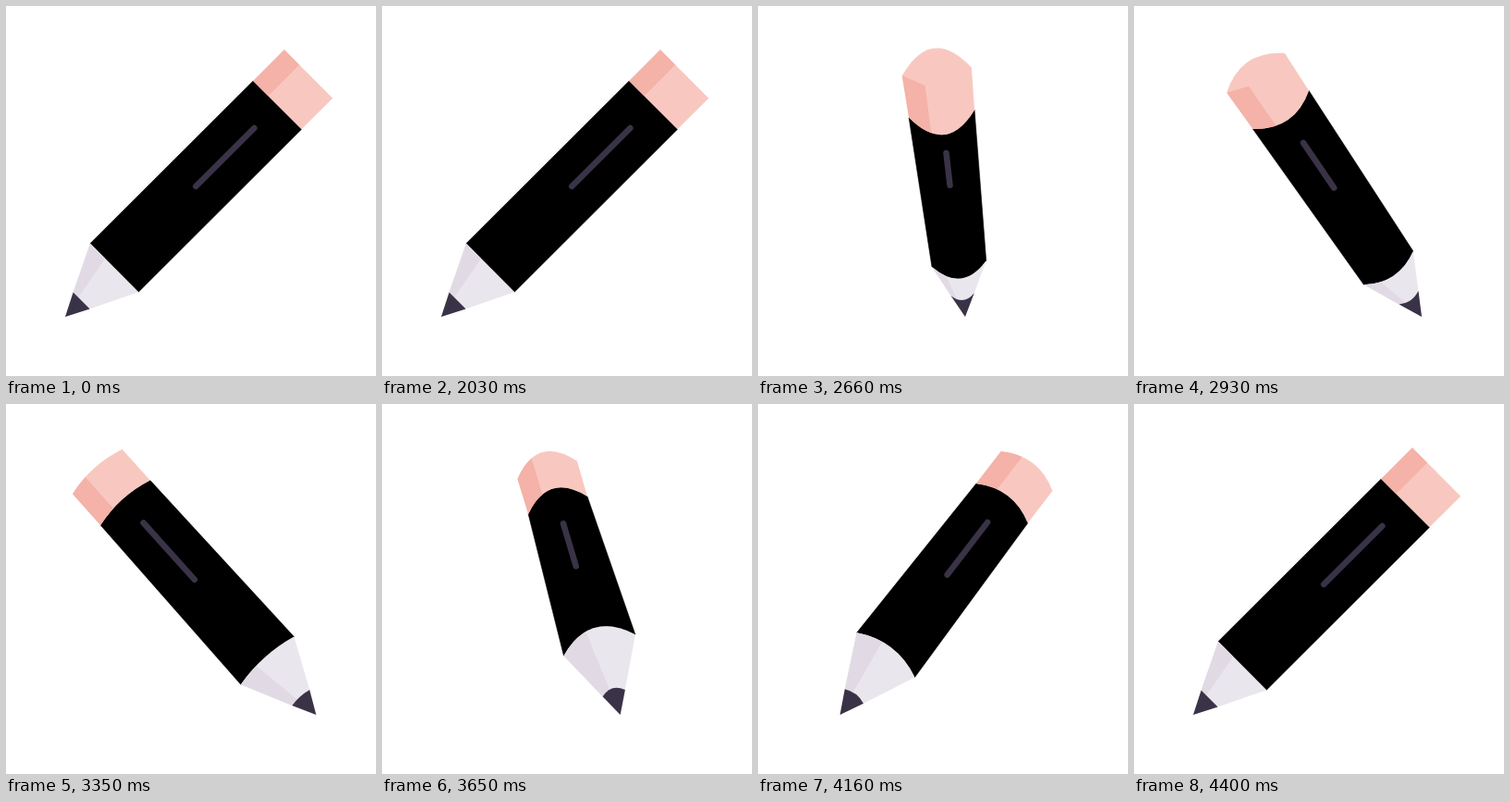
Recreate the animation shown at these times as an HTML page. Size 400 by 400 pixels, loop 4430 ms.

```html
<!DOCTYPE html>
<html lang="en">
<head>
<meta charset="utf-8">
<title>Spinning pencil</title>
<style>
  html, body { margin: 0; width: 100%; height: 100%; overflow: hidden; background: #fff; }
  svg { display: block; width: 100vw; height: 100vh; }
</style>
</head>
<body>
<svg viewBox="0 0 400 400">
  <path id="body" fill="#000" stroke="#000" stroke-width=".6"/>
  <path id="eraser" fill="#f8c8c0"/>
  <path id="eraserShade" fill="#f4b2a8"/>
  <path id="wood" fill="#eae6ed"/>
  <path id="woodShade" fill="#e1dae5"/>
  <path id="lead" fill="#3a3347"/>
  <path id="shine" fill="none" stroke="#3a3347" stroke-width="6.5" stroke-linecap="round"/>
</svg>
<script>
const LOOP = 4430, START = 2030, SPIN = 2370, STEP = 30;
const CX = 205, SPLIT = .31;

const mix = (p, q, f) => [p[0] + (q[0] - p[0]) * f, p[1] + (q[1] - p[1]) * f];
const xy = p => p[0].toFixed(2) + " " + p[1].toFixed(2);
const set = (id, d) => document.getElementById(id).setAttribute("d", d);

// Curved edge from a to b, with control point c
const curve = ({ a, b, c }) => `${xy(a)}Q${xy(c)} ${xy(b)}`;
const reverse = ({ a, b, c }) => ({ a: b, b: a, c });
function part({ a, b, c }, f) {
  const p = mix(a, c, f);
  return { a, c: p, b: mix(p, mix(c, b, f), f) };
}

function draw(ms) {
  const spin = Math.max(0, Math.floor((ms - START) / STEP) * STEP);
  const angle = spin / SPIN * Math.PI * 2;
  const s = Math.sin(angle), c = Math.cos(angle);
  // Value at rest, change when foreshortened, change when the tip is far
  const vary = (rest, thin, far) => rest + thin * s * s + far * s;
  const depth = s * Math.sqrt(Math.abs(s));

  const end = [CX + c * vary(122, -55, 0) - 5 * s, vary(73.5, -2.5, 0)];
  const tip = [CX - c * 141 + 5 * s, 336];
  const len = Math.hypot(tip[0] - end[0], tip[1] - end[1]);
  const ux = (tip[0] - end[0]) / len, uy = (tip[1] - end[1]) / len;

  // Rim across the axis at fraction f; a positive bulge points to the tip
  function rim(f, r, bulge) {
    const [x, y] = mix(end, tip, f), d = 2 * r * bulge;
    return {
      a: [x - uy * r, y + ux * r],
      b: [x + uy * r, y - ux * r],
      c: [x + ux * d, y + uy * d]
    };
  }

  const capR = vary(37, -1.5, 2.3);
  const cap = rim(0, capR, -.68 * Math.abs(depth));
  const face = rim(0, capR, depth > 0 ? .42 * depth : .68 * depth);
  const ring = rim(vary(.128, .032, .012), vary(37, -2.8, 1.5), .64 * depth);
  const wood = rim(vary(.798, -.055, .04), vary(37, -2, -5.5), .55 * depth);
  const lead = rim(vary(.933, -.025, 0), 12.7, .5 * depth);

  const band = (p, q) => `M${curve(p)}L${curve(reverse(q))}Z`;
  const shade = (p, q, f) => band(part(p, f), part(q, f));
  const edge = part(face, SPLIT);
  if (s > 0) edge.c = mix(edge.a, edge.b, .5);

  set("body", band(ring, wood));
  set("eraser", band(cap, ring));
  set("eraserShade", band(edge, part(ring, SPLIT)));
  set("wood", `M${curve(wood)}L${xy(lead.b)}L${xy(tip)}L${xy(lead.a)}Z`);
  set("woodShade", shade(wood, lead, vary(SPLIT, 0, -.07)));
  set("lead", `M${curve(lead)}L${xy(tip)}Z`);
  set("shine", `M${xy(mix(end, tip, vary(.223, .055, .055)))}L${
    xy(mix(end, tip, vary(.463, -.04, .04)))}`);
}

const begin = performance.now();
function frame() {
  draw((performance.now() - begin) % LOOP);
  requestAnimationFrame(frame);
}
draw(0);
requestAnimationFrame(frame);
</script>
</body>
</html>
```
